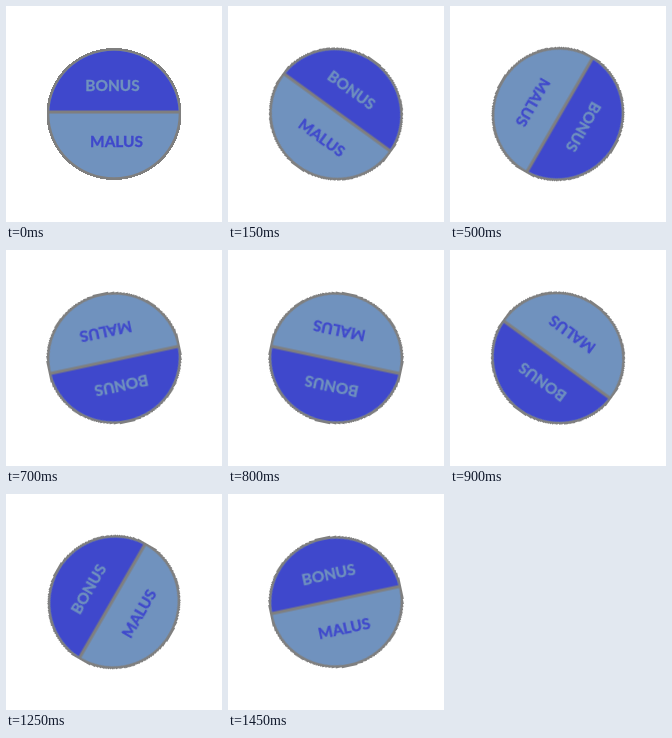
An HTML page for the animation above (1.5 s loop, 216 by 216 pixels).

```html
<!DOCTYPE html>
<html lang="en">
<head>
<meta charset="utf-8">
<title>Bonus / Malus</title>
<style>
  html, body {
    margin: 0;
    width: 100%;
    height: 100%;
    overflow: hidden;
    background: #fff;
  }
  svg {
    display: block;
    width: 100vw;
    height: 100vh;
  }
  .wheel {
    --dark: #3f48cc;
    --light: #7092be;
    --grey: #7f7f7f;
    transform-origin: 108px 108px;
    animation: spin 1.5s steps(30) infinite;
  }
  .dark { fill: var(--dark); stroke: var(--dark); }
  .light { fill: var(--light); stroke: var(--light); }
  .rim { fill: var(--grey); shape-rendering: crispEdges; }
  .line { stroke: var(--grey); stroke-width: 3; }
  ellipse { stroke: none; }
  text {
    font: bold 15.4px Lato, Carlito, sans-serif;
    text-anchor: middle;
    stroke-width: .35;
  }
  @keyframes spin {
    to { transform: rotate(360deg); }
  }
</style>
</head>
<body>
<svg viewBox="0 0 216 216">
  <defs>
    <clipPath id="top"><path d="M0 0H216V106H0Z"/></clipPath>
  </defs>
  <g class="wheel">
    <ellipse class="rim" cx="108" cy="108" rx="67.5" ry="66"/>
    <ellipse class="light" style="stroke:none" cx="108" cy="108" rx="64.7" ry="63.2"/>
    <ellipse class="dark" style="stroke:none" cx="108" cy="108" rx="64.7" ry="63.2" clip-path="url(#top)"/>
    <path class="line" d="M42 106H174"/>
    <text class="light" x="106.5" y="84.5">BONUS</text>
    <text class="dark" x="110.5" y="140.5">MALUS</text>
  </g>
</svg>
</body>
</html>
```
